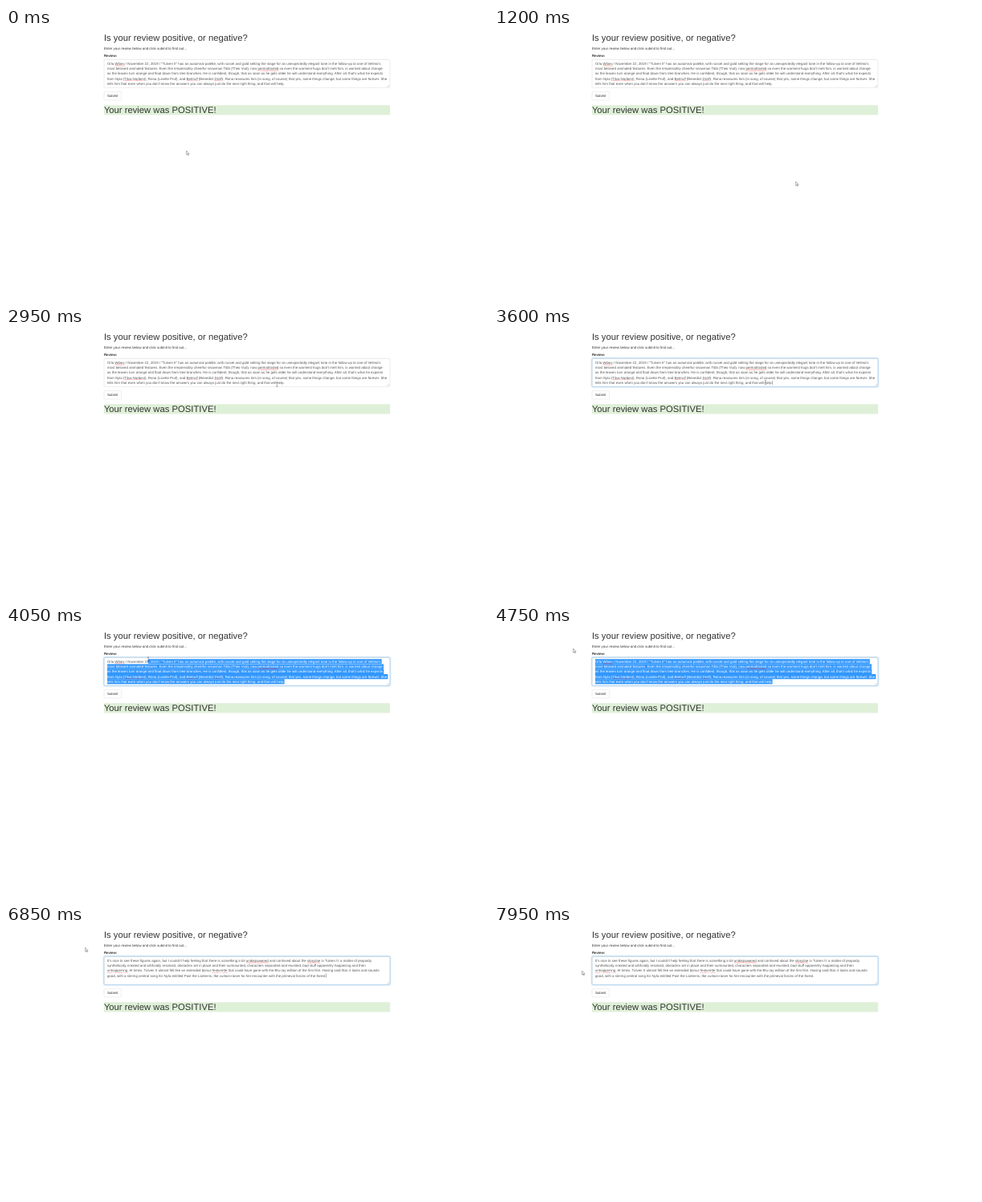
These frames come from a looping animation (600 px wide and 338 px high, 8 s). An HTML page:

```html
<!DOCTYPE html>
<html lang="en">
<head>
<meta charset="utf-8">
<title>Review sentiment</title>
<style>
  html, body { margin: 0; width: 100%; height: 100%; overflow: hidden; background: #fff; }
  * { box-sizing: border-box; }
  #page {
    position: absolute; left: 0; top: 0; width: 1920px; height: 1082px; overflow: hidden;
    transform: scale(.3125); transform-origin: 0 0;
    font: 14px/20px "Liberation Sans", Arial, sans-serif; color: #333;
    text-rendering: geometricPrecision;
  }
  main { position: absolute; left: 390px; top: 20px; width: 1140px; }
  h1 { margin: 0; font-size: 36px; line-height: 39.6px; font-weight: 400; }
  p { margin: 10px 0; }
  label { display: block; margin-bottom: 5px; font-weight: 700; }
  #field {
    position: relative; height: 114px; margin-bottom: 15px; color: #555;
    border: 1px solid #ccc; border-radius: 4px; box-shadow: inset 0 1px 1px rgba(0, 0, 0, .075);
  }
  #ring {
    position: absolute; inset: -1px; border: 1px solid #66afe9; border-radius: 4px;
    box-shadow: inset 0 1px 1px rgba(0, 0, 0, .075), 0 0 8px rgba(102, 175, 233, .6);
  }
  #grip { position: absolute; right: 1px; bottom: 1px; }
  .text { position: absolute; left: 12px; top: 6px; }
  .line { height: 20px; width: max-content; white-space: pre; }
  .line u { text-decoration: underline wavy #f00 1px; text-decoration-skip-ink: none; }
  .selected .line { background: #3297fd; color: #fff; }
  .caret {
    display: inline-block; width: 1px; height: 16px; margin-right: -1px;
    vertical-align: -3px; background: #000;
  }
  .button {
    width: max-content; height: 34px; padding: 6px 12px; margin-bottom: 20px;
    border: 1px solid #ccc; border-radius: 4px; background: #fff;
  }
  .result { background: #dff0d8; }
  #pointer { position: absolute; left: 0; top: 0; overflow: visible; }
</style>
</head>
<body>
<div id="page">
  <main>
    <h1>Is your review positive, or negative?</h1>
    <p>Enter your review below and click submit to find out...</p>
    <label>Review:</label>
    <div id="field">
      <div id="ring"></div>
      <svg id="grip" width="12" height="12" fill="none" stroke="#888"><path d="M1 11L11 1M6 11L11 6"/></svg>
    </div>
    <div class="button">Submit</div>
    <h1 class="result">Your review was POSITIVE!</h1>
  </main>
  <svg id="pointer" width="12" height="19">
    <path id="arrow" d="M.5.5V16.5L4.2 13l2.5 5.6 2.4-1-2.4-5.5H11.6z" fill="#fff" stroke="#000"/>
    <path id="beam" d="M-3.5-8.5H-1L0-7.5 1-8.5H3.5M0-7.5V7.5M-3.5 8.5H-1L0 7.5 1 8.5H3.5" fill="none" stroke="#000"/>
  </svg>
</div>
<script>
const SCALE = .3125, LOOP = 8000;
const FOCUS = 3300, DRAG = 3650, RELEASE = 4350, CLEAR = 5000, PASTE = 6400;
const ROW = 20, TEXT_X = 403, TEXT_Y = 131.6;

// Words between underscores carry the spelling mark.
const firstReview = [
  'Orla _Wibex_ / November 22, 2019 / "Tulven II" has an autumnal palette, with russet and gold setting the stage for an unexpectedly elegant tone in the follow-up to one of Vellmo\'s ',
  "most beloved animated features. Even the irrepressibly cheerful snowman Tibb (Theo Vud), now _permafrosted_ so even the warmest hugs don't melt him, is worried about change ",
  "as the leaves turn orange and float down from tree branches. He is confident, though, that as soon as he gets older he will understand everything. After all, that's what he expects ",
  "from Nyla (_Tilva Norbest_), Rona (Lisette Pruf), and _Bertrulf_ (Benedict _Drolf_). Rona reassures him (in song, of course) that yes, some things change, but some things are forever. She ",
  "tells him that even when you don't know the answers you can always just do the next right thing, and that will help."
];
const secondReview = [
  "It's nice to see these figures again, but I couldn't help feeling that there is something a bit _underpowered_ and contrived about the _storyline_ in Tulven II: a matter of jeopardy ",
  "synthetically created and artificially resolved, obstacles set in place and then surmounted, characters separated and reunited, bad stuff apparently happening and then ",
  "_unhappening_. At times, Tulven II almost felt like an extended bonus _featurette_ that could have gone with the Blu-ray edition of the first film. Having said that, it looks and sounds ",
  "good, with a stirring central song for Nyla entitled Past the Lanterns, the curtain-raiser for her encounter with the primeval forces of the forest."
];

// time, x, y in stage pixels
const path = [
  [0, 224.5, 153], [880, 442, 191], [1200, 375.5, 191.5], [1700, 428, 194.5],
  [2300, 324, 117], [2550, 331, 97], [3050, 338, 69], [DRAG, 338, 69],
  [4300, 98.5, 28], [7690, 98.5, 28], [7950, 109.5, 57], [LOOP, 109.5, 57]
];

const $ = id => document.getElementById(id);
const clamp = v => Math.min(1, Math.max(0, v));
const show = (el, on) => { el.style.visibility = on ? 'visible' : 'hidden'; };

function addText(lines, className = '') {
  const block = document.createElement('div');
  block.className = 'text ' + className;
  block.innerHTML = lines
    .map(line => `<div class="line">${line.replace(/_(.+?)_/g, '<u>$1</u>')}</div>`).join('');
  const caret = document.createElement('i');
  caret.className = 'caret';
  block.lastChild.append(caret);
  $('field').append(block);
  return { block, caret };
}

const first = addText(firstReview);
const selected = addText(firstReview, 'selected');
const empty = addText(['']);
const second = addText(secondReview);
const texts = [first, empty, second];

function pointerAt(t) {
  const i = path.findIndex(step => step[0] > t);
  const [t0, x0, y0] = path[i - 1], [t1, x1, y1] = path[i];
  const k = clamp((t - t0) / (t1 - t0)), e = k * k * (3 - 2 * k);
  return { x: (x0 + (x1 - x0) * e) / SCALE, y: (y0 + (y1 - y0) * e) / SCALE };
}

function drawSelection({ x, y }) {
  const row = Math.floor((y - TEXT_Y) / ROW);
  const start = Math.max(0, x - TEXT_X);
  [...selected.block.children].forEach((line, i) => {
    show(line, i >= row);
    line.style.clipPath = i === row ? `inset(0 0 0 ${start}px)` : 'none';
  });
}

function render(t) {
  const p = pointerAt(t);
  const dragging = t >= DRAG && t < RELEASE;
  const selecting = t >= DRAG && t < CLEAR;
  const inField = p.x > 390 && p.x < 1530 && p.y > 125 && p.y < 238;
  const overText = dragging || inField;

  $('pointer').style.transform = `translate(${p.x}px, ${p.y}px)`;
  show($('beam'), overText);
  show($('arrow'), !overText);
  $('ring').style.opacity = clamp((t - FOCUS) / 150);

  const current = t < CLEAR ? first : t < PASTE ? empty : second;
  texts.forEach(text => { text.block.style.display = text === current ? '' : 'none'; });
  selected.block.style.display = selecting ? '' : 'none';
  if (selecting) drawSelection(p);

  const since = t - (t < CLEAR ? FOCUS : t < PASTE ? CLEAR : PASTE);
  show(current.caret, since >= 0 && !selecting && since % 1000 < 500);
}

show(selected.caret, false);
const begin = performance.now();
function tick() {
  render((performance.now() - begin) % LOOP);
  requestAnimationFrame(tick);
}
tick();
</script>
</body>
</html>
```
